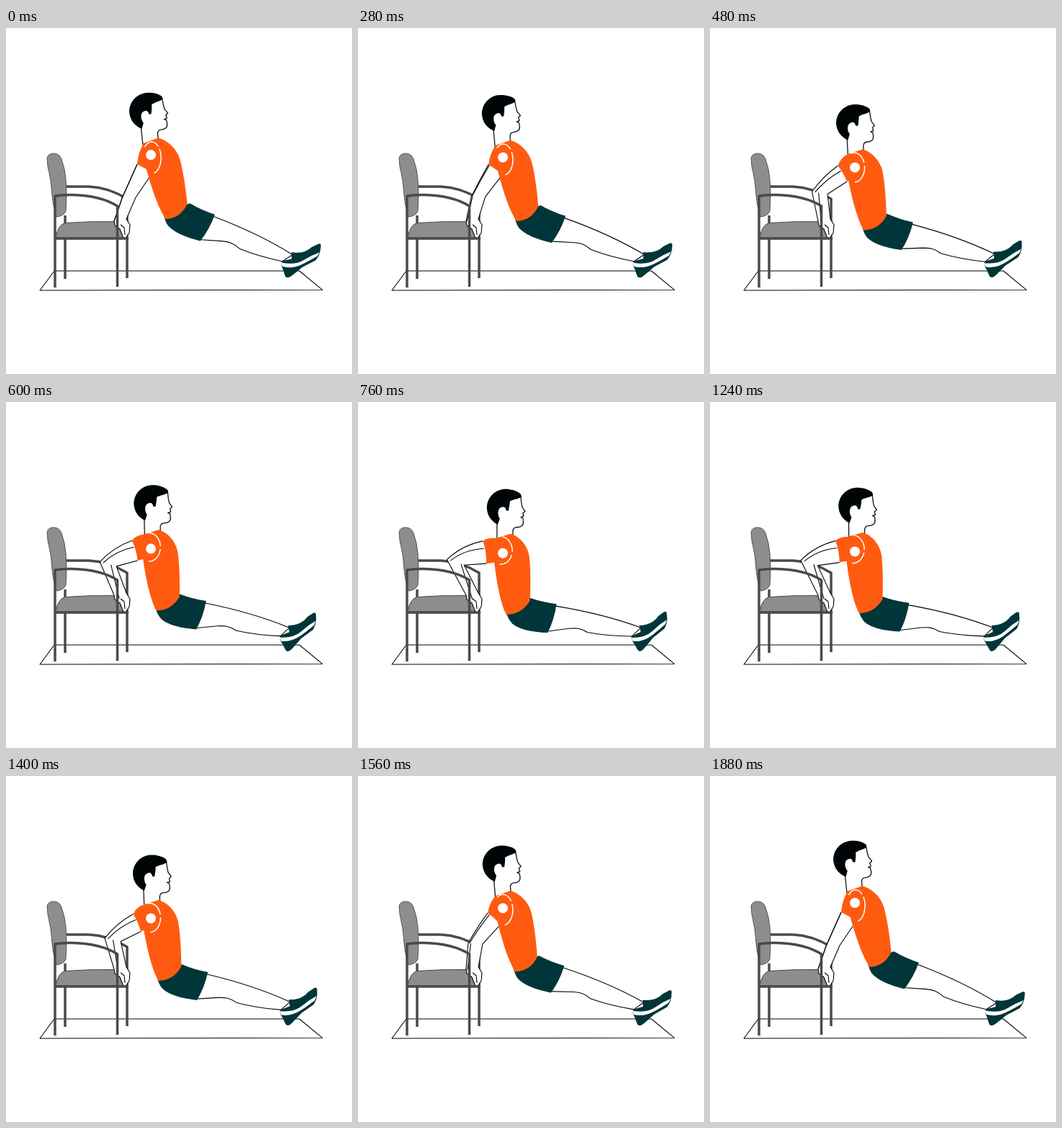
Write an HTML page with a canvas that moves like this. It is 480 px wide and 480 px high and loops after 1920 ms.

```html
<!DOCTYPE html>
<html lang="en">
<head>
<meta charset="utf-8">
<title>Chair dip</title>
<style>
html, body { margin: 0; height: 100%; overflow: hidden; background: #fff; }
canvas { display: block; width: 480px; height: 480px; }
</style>
</head>
<body>
<canvas id="stage" width="480" height="480"></canvas>
<script>
const ctx = document.getElementById('stage').getContext('2d');
const LOOP = 1920, STEP = 40, DEG = Math.PI / 180;
const INK = '#050505', METAL = '#4a494b', PAD = '#8d8d8d';
const ORANGE = '#ff5b10', TEAL = '#003639', WHITE = '#fff';

const MAT = new Path2D('M67 337H407L439 363.300L47 364Z');
const BACKREST = new Path2D('M57 181Q58 174 66 174Q74 174 77 182Q82 196 83 210Q85 230 83 254Q80 261 70 262Q66 252 64 232Q63 212 58 192Z');
const SEAT = new Path2D('M69 291Q72 273 82 270.500Q115 268 150 268.500Q161 272 163 291Z');
const REAR = new Path2D('M82 260V348M83 220H115C138 221 155 229 168 237V347');
const FRONT = new Path2D('M68 360V233Q78 231 92 231.500C120 232 140 238 154.500 247V359M68 292H170');

// Head around its own centre; the rest in the lowest pose.
const FACE = new Path2D('M23-17L24-6L25 0L29 6L26 8.500L27 13L23 14L26 15.500L26.500 20C27 26 23 28 18 28C14 28 12 30 12 34V46H-10V22');
const HAIR = new Path2D('M23-18C18-23 8-25 2-25C-10-25-23-16-24 0C-24 12-17 20-9 24L-6 16C-10 10-9 1-3 0C0-1 2 0 3 5H6C7 0 8-4 8-8C13-11 20-11 24-14Z');
const TORSO = new Path2D('M191 190L212 184C222 187 235 198 237.500 216C239.500 235 239 258 238 277C230 290 219 296 205 296C196 278 191 245 188 215V200Z');
const LEG = new Path2D('M274 284C300 288 345 296 392 313L380 325Q345 325 318 320C308 314 302 314 292 315L264 319');
const SHORTS = new Path2D('M205 293L238 273Q256 279 275 281Q272 303 263 321Q228 320 214 309Q208 303 205 293Z');
const SHOE = new Path2D('M379 325L392 319L390 310Q408 309 416 297L424 291Q428 289 428 294Q430 305 425 314L409 327Q401 337 396 343Q391 348 388 344L384 337L380 331Z');
const STRIPE = new Path2D('M379 327Q399 327 409 317Q418 308 428 302L426 308Q415 318 407 324Q395 333 381 332Z');
const HAND = 'L151 274L158 279L162 289Q165 295 167 290L171 284L172 273L167 265';

const mix = (a, b, k) => a.map((v, i) => v + (b[i] - v) * k);
const shift = ([x, y], dx, dy) => [x + dx, y + dy];

function paint(path, fill, line, width = 1.1) {
  if (fill) { ctx.fillStyle = fill; ctx.fill(path); }
  if (line) { ctx.strokeStyle = line; ctx.lineWidth = width; ctx.stroke(path); }
}

function moved(action) {
  ctx.save();
  action();
  ctx.restore();
}

// The whole leg swings about the heel.
function drawLegs(d) {
  moved(() => {
    ctx.translate(388, 340);
    ctx.rotate(12 * DEG * (1 - d));
    ctx.translate(-388, -340);
    paint(LEG, WHITE, INK);
    paint(SHORTS, TEAL);
    paint(SHOE, TEAL);
    paint(STRIPE, WHITE);
  });
}

function drawHead(d) {
  moved(() => {
    ctx.translate(...mix([195, 115], [203, 147], d));
    ctx.rotate(-6 * DEG * (1 - d));
    paint(FACE, WHITE, '#04181b', 1.3);
    paint(HAIR, '#000507');
  });
}

// The torso rises and leans back from the collar as a shear.
function drawTorso(d) {
  moved(() => {
    const lift = 1 - d, lean = .155 * lift, slope = -.06 * lift;
    ctx.transform(1, slope, lean, 1, -190 * lean, -31 * lift - 205 * slope);
    paint(TORSO, ORANGE);
  });
}

function drawArm(d, cuffTop, cuffLow) {
  const outer = mix([161, 236], [122, 218], d);
  const inner = mix([180, 235], [146, 226], d);
  const bend = (a, b) => shift(mix(a, b, .5), -5 * d, -7 * d);
  paint(new Path2D(`M${cuffTop}Q${bend(cuffTop, outer)} ${outer}L150 268${HAND}L${inner}L${cuffLow}`), WHITE, INK);

  // The nearer arm parts from the farther one as the elbow folds.
  const gap = Math.min(1, 2 * d);
  const start = mix(cuffTop, cuffLow, .33 * gap), elbow = mix(outer, inner, .2 * gap);
  paint(new Path2D(`M${start}Q${bend(start, elbow)} ${elbow}`), null, INK);
  paint(new Path2D(`M${mix(outer, inner, .85 * d)}L${mix([150, 268], [159, 274], d)}M159 273L164 277L165 287`), null, INK);
}

function drawSleeve(d, cuffTop, cuffLow) {
  const collar = mix([191, 160], [191, 190], d);
  const mark = mix([201, 176], [201, 211], d);
  const edge = shift(mix(collar, cuffTop, .5), -3, -3);
  const hem = shift(mix(cuffTop, cuffLow, .5), 3 * d, -1);
  paint(new Path2D(`M${collar}Q${edge} ${cuffTop}Q${hem} ${cuffLow}L${shift(mark, 6, 10)}L${shift(mark, 6, -16)}Z`), ORANGE);

  const [x, y, rx, ry, from, gap, to] = mix([202, 180, 13, 22, -2.4, -.8, 1.3], [198, 207, 16, 19, -1.4, .15, 1.7], d);
  for (const [a, b] of [[from, gap], [gap + .2, to]]) {
    const seam = new Path2D();
    seam.ellipse(x, y, rx, ry, 0, a, b);
    paint(seam, null, WHITE, 1.5);
  }
  const dot = new Path2D();
  dot.arc(...mark, 7, 0, 7);
  paint(dot, WHITE);
}

function draw(t) {
  // Depth goes 0 to 1 and back, cubic in and out each way.
  const x = 1 - Math.abs(2 * t / LOOP - 1);
  const d = x < .5 ? 4 * x ** 3 : 1 - 4 * (1 - x) ** 3;
  const cuff = [mix([182, 189], [173, 193], d), mix([203, 201], [177, 225], d)];

  ctx.fillStyle = WHITE;
  ctx.fillRect(0, 0, 480, 480);
  paint(MAT, null, INK);
  paint(REAR, null, METAL, 3.5);
  paint(BACKREST, PAD, '#555', 1);
  paint(SEAT, PAD, METAL, 1);
  drawLegs(d);
  drawHead(d);
  drawArm(d, ...cuff);
  drawTorso(d);
  drawSleeve(d, ...cuff);
  paint(FRONT, null, METAL, 3.5);
}

ctx.lineJoin = 'round';
function tick() {
  draw(Math.floor(performance.now() % LOOP / STEP) * STEP);
  requestAnimationFrame(tick);
}
tick();
</script>
</body>
</html>
```
